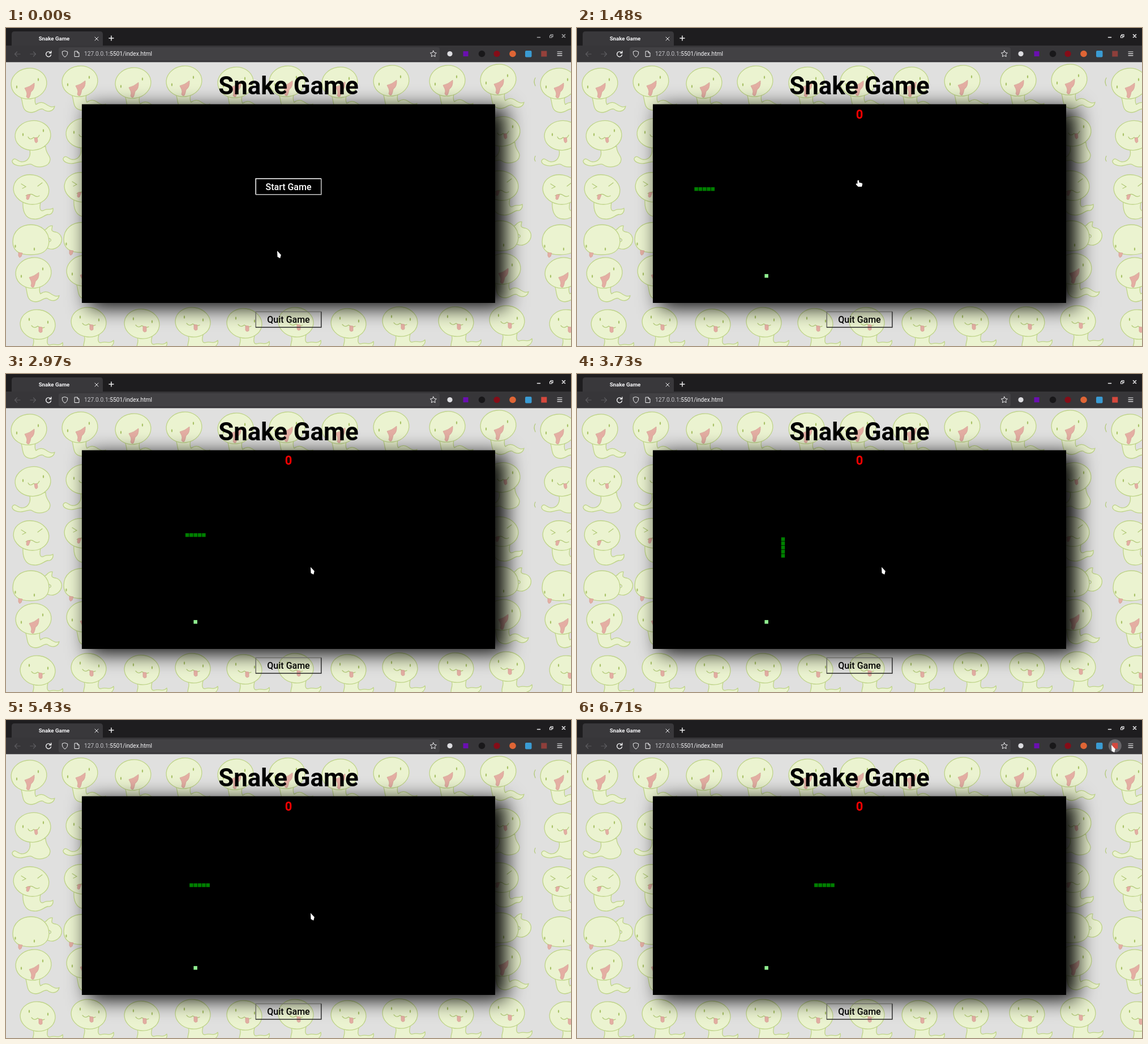
These frames come from a looping animation (998 by 561 pixels, 6760 ms). An HTML page:

```html
<!DOCTYPE html>
<html lang="en">
<head>
<meta charset="utf-8">
<title>Snake Game</title>
<style>
  html, body { margin: 0; width: 100%; height: 100%; overflow: hidden; background: #e0e0df; }
  svg { display: block; width: 100vw; height: 100vh; font-family: Roboto, Arial, sans-serif; }
  .skin { fill: #ebf3d0; stroke: #bfd489; stroke-width: 1.3; stroke-linejoin: round; }
  .eye { fill: #a9c268; }
  .line { fill: none; stroke: #b1c976; stroke-width: 1.2; stroke-linecap: round; }
  .tongue { fill: #e4aea3; stroke: #d39e92; stroke-width: .7; }
  .icon { fill: none; stroke: #eeeef0; stroke-width: 1.2; stroke-linecap: round; stroke-linejoin: round; }
  .mid { text-anchor: middle; }
  .label { font-size: 16px; font-weight: 500; text-anchor: middle; }
  .bevel { fill: none; stroke-width: 1.5; }
</style>
</head>
<body>
<svg viewBox="0 0 998 561" preserveAspectRatio="none">
  <defs>
    <filter id="blur" x="-20%" y="-40%" width="140%" height="180%">
      <feGaussianBlur stdDeviation="18"/>
    </filter>
    <g id="laugh">
      <path class="skin" d="M26 121C31 130 26 148 44 149C55 149 58 141 65 143C74 150 84 147 86 138C81 141 76 138 70 134C63 129 57 132 53 135C50 131 51 126 52 121Z"/>
      <ellipse class="skin" cx="40.5" cy="98" rx="31.5" ry="27" transform="rotate(-8 40.5 98)"/>
      <ellipse class="eye" cx="19" cy="104" rx="1.2" ry="2.8"/>
      <ellipse class="eye" cx="57" cy="91" rx="1.2" ry="2.8"/>
      <path class="tongue" d="M33 106Q42 104 50 97Q51 108 44 113Q43 119 41 123Q38 125 36 121Q38 116 36 112Z"/>
    </g>
    <g id="smile">
      <path class="skin" d="M41 212C46 226 38 237 27 236C20 236 16 226 11 234C10 240 20 244 28 243C38 242 42 238 46 241C56 248 77 246 78 232C78 224 70 222 70 209Z"/>
      <ellipse class="skin" cx="47.5" cy="189.5" rx="31.5" ry="26" transform="rotate(-6 47.5 189.5)"/>
      <ellipse class="eye" cx="30" cy="188" rx="1.2" ry="2.8"/>
      <ellipse class="eye" cx="66" cy="181" rx="1.2" ry="2.8"/>
      <path class="line" d="M39 192Q42 199 49 193Q55 197 59 189"/>
      <path class="tongue" d="M50 194L55 193L56 200Q53 205 51 200Z"/>
    </g>
    <g id="frown">
      <path class="skin" d="M30 306C29 320 32 337 50 337C62 338 67 330 74 329C80 330 84 324 83 318C78 322 74 318 68 321C60 326 58 318 62 304Z"/>
      <ellipse class="skin" cx="44.5" cy="285" rx="31.5" ry="26" transform="rotate(10 44.5 285)"/>
      <path class="line" d="M27 275L35 280L29 283M56 279L64 273M35 296Q44 291 49 295T59 296"/>
      <path class="tongue" d="M37 294L43 294L40 302Q36 304 36 300Z"/>
    </g>
    <g id="nap">
      <path class="skin" d="M66 357C72 357 73 348 82 349C81 356 78 358 88 360C104 365 101 386 83 390C78 391 74 389 70 387L70 376C79 380 85 372 72 370Z"/>
      <path class="skin" d="M12 377C12 337 76 337 76 377C75 395 62 400 43 400C24 400 12 394 12 377Z"/>
      <ellipse class="eye" cx="16.5" cy="385" rx="1.2" ry="2.8"/>
      <ellipse class="eye" cx="50" cy="390" rx="1.2" ry="2.8"/>
      <path class="tongue" d="M22 396L29 397L27 403L24 405L22 402Z"/>
    </g>
    <g id="blep">
      <path class="skin" d="M48 547C52 556 44 562 48 570L84 570C96 568 102 562 100 555C94 562 86 556 78 559C72 560 72 553 74 545Z"/>
      <ellipse class="skin" cx="56" cy="523" rx="31" ry="26" transform="rotate(8 56 523)"/>
      <ellipse class="eye" cx="41" cy="514" rx="1.2" ry="2.8"/>
      <ellipse class="eye" cx="74" cy="519" rx="1.2" ry="2.8"/>
      <path class="line" d="M45 525Q50 531 56 526Q62 531 68 528"/>
      <path class="tongue" d="M58 527L64 528L64 536Q60 539 58 535Z"/>
    </g>
  </defs>

  <rect width="998" height="561" fill="#e0e0df"/>
  <g id="wall"></g>
  <path class="line" d="M935 88Q931 94 935 102M935 226Q932 231 935 235"/>

  <rect x="145" y="141.8" width="738" height="350.5" filter="url(#blur)"/>
  <rect x="134" y="134.5" width="730" height="350.5"/>
  <text class="mid" x="499" y="117" font-size="43.8" font-weight="700">Snake Game</text>

  <g id="start">
    <path class="bevel" stroke="#fff" d="M441.2 294V265.8H557"/>
    <path class="bevel" stroke="#c9c9c9" d="M441 293.7H556.8V266"/>
    <text class="label" x="499" y="285.5" fill="#fff">Start Game</text>
  </g>
  <path class="bevel" stroke="#6d6d68" d="M441.2 528.5V500.4H557"/>
  <path class="bevel" stroke="#2a2a2a" d="M441 528H556.8V500.5"/>
  <text class="label" x="499" y="520">Quit Game</text>

  <g id="game">
    <text class="mid" x="499" y="160" font-size="21.9" font-weight="700" fill="#f00">0</text>
    <g id="snake" fill="#008000"></g>
    <rect x="331.4" y="434.1" width="6.5" height="6.5" fill="#90ee90"/>
  </g>

  <rect width="998" height="31" fill="#1e1d1f"/>
  <rect y="31" width="998" height="29.3" fill="#373639"/>
  <path d="M10 31V11Q10 6 15 6H166Q171 6 171 11V31Z" fill="#39383b"/>
  <text class="mid" x="85" y="22" font-size="9.7" font-weight="700" fill="#f5f5f7">Snake Game</text>
  <path class="icon" style="stroke-width:1" d="M157 16L163 22M163 16L157 22"/>
  <path class="icon" style="stroke-width:1.5" d="M182 18H190M186 14V22"/>
  <g id="controls" class="icon">
    <path style="stroke-width:1.6" d="M938.5 16.5H943.5"/>
    <path d="M960.5 13.5H964V17H960.5ZM962 13V11.5H966V15.5H964.5"/>
    <path style="stroke-width:1.6" d="M982.5 11.5L987.5 16.5M987.5 11.5L982.5 16.5"/>
  </g>

  <rect x="93" y="34" width="673" height="23.5" rx="4" fill="#424144"/>
  <path class="icon" style="stroke:#5c5b5f" d="M25 46H15.5M19.5 42L15.5 46L19.5 50M43 46H52.5M48.5 42L52.5 46L48.5 50"/>
  <path class="icon" style="stroke-width:1.4" d="M78.7 43.4A4.5 4.5 0 1 0 79.5 47.3M79.8 40.8V44.2H76.4"/>
  <path class="icon" style="stroke-width:1" d="M104 40.5L108.7 42Q109.2 48.5 104 51.2Q98.8 48.5 99.3 42ZM121.5 41H126L129 44V50.5H121.5ZM126 41V44H129"/>
  <text x="138" y="49" font-size="10.25" fill="#f4f4f6"><tspan fill="#c4c4c8">127.0.0.1</tspan>:5501/index.html</text>
  <path class="icon" style="stroke-width:1" d="M754.8 40L756.5 43.5L760.3 44L757.5 46.7L758.2 50.5L754.8 48.7L751.4 50.5L752.1 46.7L749.3 44L753.1 43.5Z"/>
  <circle cx="784" cy="45.5" r="4.6" fill="#dcdce0"/>
  <rect x="807.5" y="41" width="9" height="9" fill="#6a0fb0"/>
  <circle cx="840.5" cy="45.5" r="5.8" fill="#19181a"/>
  <circle cx="867" cy="45.5" r="5.6" fill="#850d18"/>
  <circle cx="895" cy="45.5" r="5.8" fill="#df6535"/>
  <rect x="917" y="40" width="11.5" height="11.5" rx="2" fill="#3a9bd3"/>
  <circle id="halo" cx="950.3" cy="45.5" r="11.5" fill="#68676b"/>
  <rect id="rec" x="945.3" y="40.5" width="10" height="10" fill="#d5483d"/>
  <path class="icon" d="M974 42H982M974 45.3H982M974 48.6H982"/>

  <g id="cursor" fill="#fff">
    <path id="arrow" d="M0 0L6.8 7.2L5.2 13.2L.5 10.8Z"/>
    <path id="hand" d="M-1.6 .8Q0 -1 1.2 .8V4L6.4 5.2Q7.6 6 7 8L6 11.4H-.4L-4.2 7.4Q-4.6 5.4 -2.8 5.8L-1.6 6.8Z"/>
  </g>
</svg>
<script>
const LOOP = 6760, CELL = 7.3, LEFT = 134, TOP = 134.5;
const LENGTH = 5, TICK = 100, BEGIN = 1470;
const NS = "http://www.w3.org/2000/svg";
const el = id => document.getElementById(id);
const show = (id, on) => el(id).setAttribute("visibility", on ? "visible" : "hidden");

function add(parent, tag, attrs) {
  const node = document.createElementNS(NS, tag);
  for (const key in attrs) node.setAttribute(key, attrs[key]);
  return el(parent).appendChild(node);
}

// Wallpaper: each row repeats one drawing along the same columns.
const columns = [[0, 0], [90, -4], [184, -1], [274, -4], [365, -2], [456, -4],
                 [549, -2], [640, -5], [739, -5], [829, -7], [935, 0]];
const rows = [["laugh", 0, 0], ["smile", 0, 0], ["frown", 0, 0],
              ["nap", 0, 0], ["laugh", 8, 334], ["blep", 0, 0]];
for (const [kind, dx, dy] of rows)
  for (const [x, y] of columns)
    add("wall", "use", { href: "#" + kind, x: x + dx, y: y + dy });

// Every cell the snake passes, expanded from its turning points.
const turns = [[10, 20], [31, 20], [31, 26], [25, 26], [25, 21], [46, 21]];
const trail = [turns[0]];
for (const [tx, ty] of turns.slice(1)) {
  let [x, y] = trail[trail.length - 1];
  while (x !== tx || y !== ty) {
    x += Math.sign(tx - x);
    y += Math.sign(ty - y);
    trail.push([x, y]);
  }
}
const body = Array.from({ length: LENGTH }, () => add("snake", "rect", { width: 6.5, height: 6.5 }));

// Pointer stops: time, x, y
const stops = [[0, 479, 393], [100, 479, 393], [700, 480, 388], [800, 480, 388],
               [1280, 497, 268.5], [2250, 497, 268.5], [2750, 538, 340.5],
               [5800, 538, 340.5], [6650, 944, 44], [LOOP, 944, 44]];

function pointerAt(t) {
  const i = stops.findIndex(s => s[0] > t);
  const [t0, x0, y0] = stops[i - 1], [t1, x1, y1] = stops[i];
  const p = (t - t0) / (t1 - t0), k = p * p * (3 - 2 * p);
  return [x0 + (x1 - x0) * k, y0 + (y1 - y0) * k];
}

function draw(t) {
  const playing = t >= BEGIN;
  show("start", !playing);
  show("game", playing);
  const step = Math.max(0, Math.floor((t - BEGIN) / TICK));
  body.forEach((part, i) => {
    const [x, y] = trail[step + i];
    part.setAttribute("x", LEFT + x * CELL + .4);
    part.setAttribute("y", TOP + y * CELL + .4);
  });

  const [x, y] = pointerAt(t);
  el("cursor").setAttribute("transform", `translate(${x} ${y})`);
  const pointing = t >= 1180 && t < 2400;
  show("hand", pointing);
  show("arrow", !pointing);
  show("halo", x > 936);

  const focused = t >= 80;
  el("controls").setAttribute("opacity", focused ? 1 : .65);
  el("rec").setAttribute("opacity", !focused ? .6 : t % 1000 < 500 ? .55 : 1);
}

function frame() {
  draw(performance.now() % LOOP);
  requestAnimationFrame(frame);
}
frame();
</script>
</body>
</html>
```
